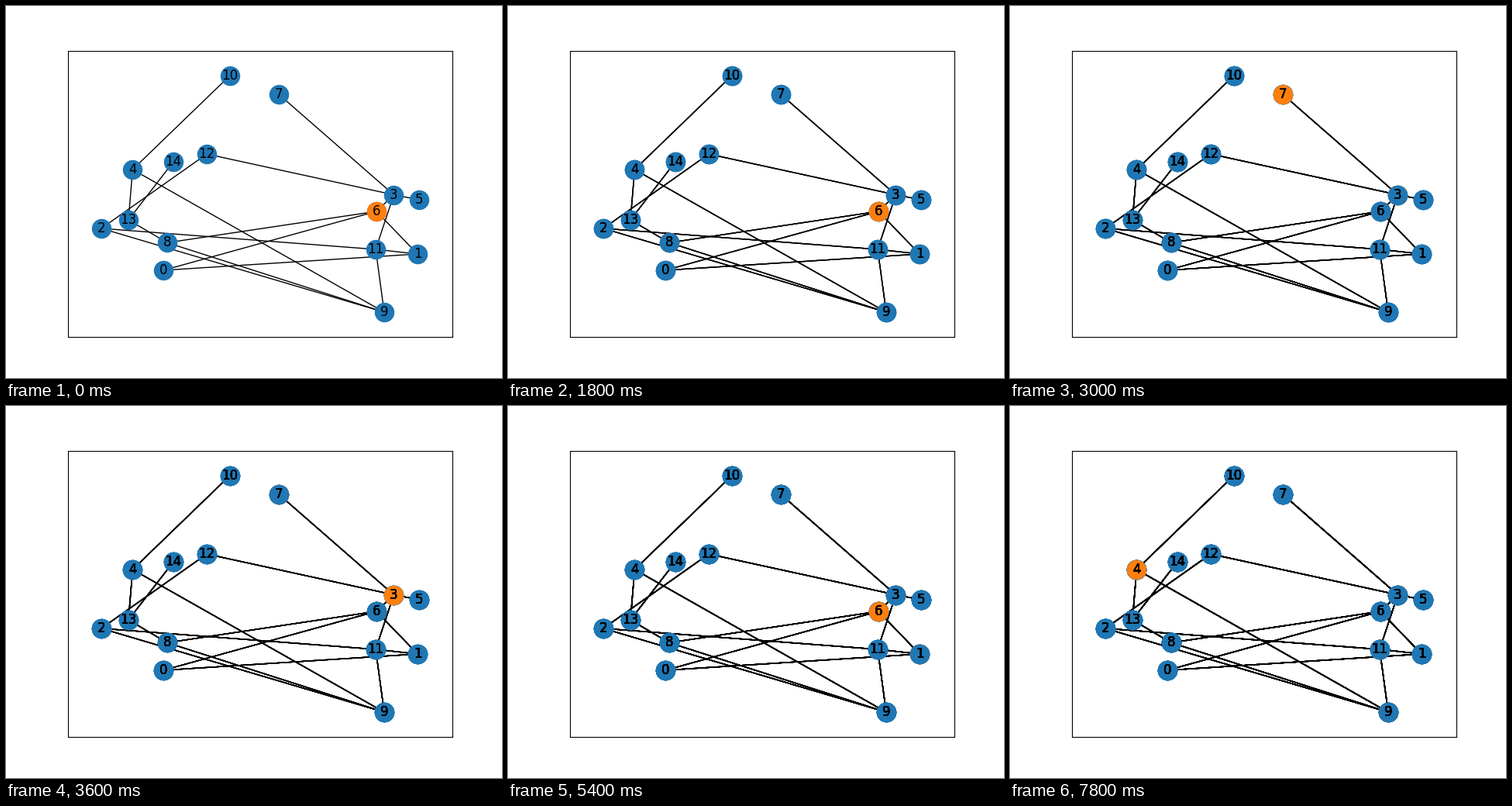
Write a matplotlib script that moves like this. It is 640 by 480 pixels and loops after 8 s.

```python
from itertools import pairwise

import matplotlib.pyplot as plt
from matplotlib.animation import FuncAnimation
from matplotlib.collections import LineCollection

TICK = 200      # ms per animation frame
STEP = 600      # ms per step of the walk
LOOP = 8000

# Node positions in pixels from the top left, in label order.
NODES = [
    (203, 341), (531, 320), (123, 287), (500.4, 243.6), (163.4, 211),
    (533, 250), (478, 265), (352, 114), (208, 305.4), (488, 395),
    (289, 89.7), (477, 314), (259, 191), (158, 276), (216, 201),
]
# Each trail links its nodes one after another.
TRAILS = [
    (10, 4, 13, 14),
    (13, 8, 9, 4),
    (7, 3, 12, 2, 9, 11, 2),
    (5, 3, 6, 8),
    (3, 11, 1, 0, 6, 1),
]
WALK = [6, 8, 6, 3, 7, 3, 6, 1, 6, 3, 11, 9, 4]

segments = [(NODES[a], NODES[b]) for trail in TRAILS for a, b in pairwise(trail)]

fig, ax = plt.subplots(figsize=(6.4, 4.8), dpi=100)
ax.set_position([0.125, 0.11, 0.775, 0.77])
ax.set_xticks([])
ax.set_yticks([])


def draw_dots(points, color):
    return ax.scatter(*zip(*points), s=300, color=color, zorder=2)


def draw_graph(active):
    """Add one full drawing of the graph and return its artists."""
    lines = LineCollection(segments, colors="black", linewidths=1.0, zorder=1)
    ax.add_collection(lines, autolim=False)
    dots = draw_dots(NODES, "C0")
    marked = draw_dots([NODES[active]], "C1")
    labels = [ax.text(x, y, str(n), size=12, family="DejaVu Sans",
                      ha="center", va="center", clip_on=True)
              for n, (x, y) in enumerate(NODES)]
    return [lines, dots, marked, *labels]


# Each step is painted over the earlier ones, so soft edges build up.
layers = [draw_graph(n) for n in WALK]
ax.set_xlim(80, 576)
ax.set_ylim(427.2, 57.6)


def update(i):
    step = max(0, i * TICK // STEP - 1)
    for k, layer in enumerate(layers):
        for artist in layer:
            artist.set_visible(k <= step)
    return []


anim = FuncAnimation(fig, update, frames=LOOP // TICK, interval=TICK,
                     repeat=True, repeat_delay=0)
plt.show()
```
